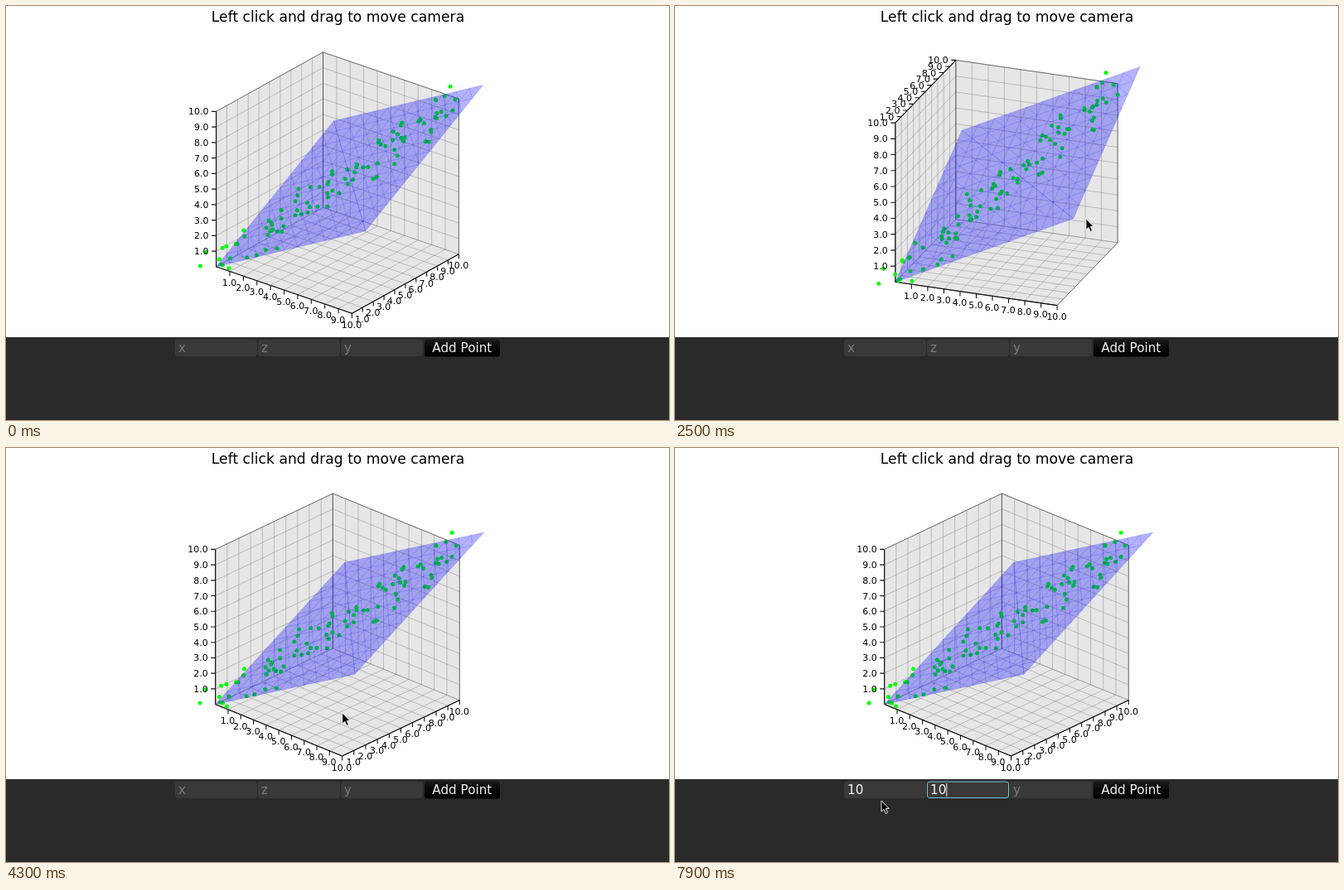
An HTML page for the animation above (8000 ms loop, 800 by 500 pixels).

```html
<!DOCTYPE html>
<html lang="en">
<head>
<meta charset="utf-8">
<title>3D scatter plot</title>
<style>
html, body { margin: 0; width: 100%; height: 100%; overflow: hidden; background: #fff; }
svg { display: block; width: 800px; height: 500px; font-family: "DejaVu Sans", sans-serif; }
path { fill: none; }
#labels { font-size: 11px; }
.form { font-size: 15.2px; }
</style>
</head>
<body>
<svg viewBox="0 0 800 500">
  <defs>
    <linearGradient id="dark" x2="0" y2="1">
      <stop offset="0" stop-color="#1a1a1a"/><stop offset=".5" stop-color="#080808"/><stop offset="1" stop-color="#020202"/>
    </linearGradient>
  </defs>
  <rect width="800" height="500" fill="#fff"/>
  <text x="400.5" y="19" font-size="17.2" text-anchor="middle">Left click and drag to move camera</text>
  <path id="walls" style="fill:#e6e6e6"/>
  <path id="grid" stroke="#777" stroke-opacity=".5" stroke-width=".8"/>
  <path id="edges" stroke="#333" stroke-opacity=".65" stroke-width=".9"/>
  <path id="axes" stroke="#111" stroke-width="1.1"/>
  <path id="dots" stroke="#00ff00" stroke-width="5" stroke-linecap="round"/>
  <path id="plane" style="fill:#0000ff" fill-opacity=".3"/>
  <path id="wire" stroke="#0000ff" stroke-opacity=".2" stroke-width=".8"/>
  <g id="labels"></g>
  <rect y="400" width="800" height="100" fill="#2a2a2a"/>
  <g class="form" id="form"></g>
  <rect x="505" y="402.5" width="91" height="21" rx="3" fill="url(#dark)"/>
  <text class="form" x="550.3" y="418" text-anchor="middle" fill="#f0f0f0">Add Point</text>
  <path id="caret" stroke="#f0f0f0"/>
  <path id="arrow" d="M0 0V13.2L3 10.4 5.3 15.4 7.6 14.4 5.4 9.5H9.3Z" style="fill:#000" stroke="#fff" stroke-width=".9"/>
  <g id="beam">
    <path d="M-3 -7.5H-1L0 -6.5 1 -7.5H3M0 -6.5V6.5M-3 7.5H-1L0 6.5 1 7.5H3" stroke="#fff" stroke-width="3.2"/>
    <path d="M-3 -7.5H-1L0 -6.5 1 -7.5H3M0 -6.5V6.5M-3 7.5H-1L0 6.5 1 7.5H3" stroke="#000" stroke-width="1.1"/>
  </g>
</svg>
<script>
const $ = id => document.getElementById(id);
const setPath = (id, d) => $(id).setAttribute('d', d);
const add = (parent, tag, attrs) => {
  const el = document.createElementNS('http://www.w3.org/2000/svg', tag);
  for (const k in attrs) el.setAttribute(k, attrs[k]);
  return parent.appendChild(el);
};
const LOOP = 8000, CX = 400, CY = 213.5, UNIT = 20.85, TURN = 0.2565;

// Pointer moves: start, end, x, y at the end; it rests between moves
const moves = [
  [40, 800, 634, 250], [870, 1730, 703, 238], [1760, 2500, 496, 257], [2500, 2620, 496, 305],
  [2620, 3730, 381, 319], [3780, 4150, 409, 318], [4250, 4880, 236, 419], [5600, 5800, 249, 426]
];
const drags = [moves[1], moves[4], moves[5]];

const progress = (t, a, b) => {
  const k = Math.min(Math.max((t - a) / (b - a), 0), 1);
  return k * k * (3 - 2 * k);
};

function pointerAt(t) {
  let x = 788, y = 3;
  for (const [from, to, mx, my] of moves) {
    const k = progress(t, from, to);
    x += (mx - x) * k;
    y += (my - y) * k;
  }
  return [x, y];
}

// Only dragging turns the camera
function cameraAt(t) {
  let yaw = 38.2, pitch = 25.9;
  for (const [from, to] of drags) {
    const a = pointerAt(from), b = pointerAt(Math.min(Math.max(t, from), to));
    yaw -= TURN * (b[0] - a[0]);
    pitch += TURN * (b[1] - a[1]);
  }
  const a = yaw * Math.PI / 180, e = pitch * Math.PI / 180;
  const ca = Math.cos(a), sa = Math.sin(a), ce = Math.cos(e), se = Math.sin(e);
  return { right: [ca, 0, sa], up: [-sa * se, ce, ca * se], near: [sa * ce, se, -ca * ce] };
}

const dot = (a, b) => a[0] * b[0] + a[1] * b[1] + a[2] * b[2];

// Noisy samples along x = y = z
let seed = 11;
const random = () => (seed = (seed * 16807) % 2147483647) / 2147483647;
const samples = Array.from({ length: 96 }, (_, i) =>
  [0, 1, 2].map(() => i / 9.5 - 5 + (random() - .5) * 1.8));

const labels = Array.from({ length: 30 }, (_, i) => {
  const el = add($('labels'), 'text', {});
  el.textContent = (i % 10 + 1).toFixed(1);
  return el;
});

const fields = ['x', 'z', 'y'].map((name, i) => {
  const x = 204 + i * 100;
  const box = add($('form'), 'rect', { x: x + .5, y: 403, width: 98, height: 19.5, rx: 2.5, fill: '#393939' });
  const text = add($('form'), 'text', { x: x + 4, y: 418 });
  return { name, x, box, text };
});

function drawPlot(cam) {
  const at = p => [CX + UNIT * dot(p, cam.right), CY - UNIT * dot(p, cam.up)];
  const fmt = p => at(p).map(c => c.toFixed(2)).join(' ');
  const line = (...pts) => 'M' + pts.map(fmt).join('L');
  const xb = cam.near[0] > 0 ? -5 : 5, zb = cam.near[2] > 0 ? -5 : 5;
  const xf = -xb, zf = -zb;

  const faces = [
    (a, b) => [a, -5, b],
    (a, b) => [xb, a, b],
    (a, b) => [a, b, zb]
  ];
  let walls = '', grid = '';
  for (const f of faces) {
    walls += line(f(-5, -5), f(5, -5), f(5, 5), f(-5, 5)) + 'Z';
    for (let k = -5; k <= 5; k++) grid += line(f(k, -5), f(k, 5)) + line(f(-5, k), f(5, k));
  }
  setPath('walls', walls);
  setPath('grid', grid);
  setPath('edges', line([xb, -5, zb], [xb, 5, zb]) + line(
    [xb, 5, zb], [xb, 5, zf], [xb, -5, zf], [xf, -5, zf], [xf, -5, zb], [xf, 5, zb]) + 'Z');

  // Shallow axes run along the floor, steep ones along the top of a wall
  const steep = v => Math.abs(cam.up[v]) > Math.abs(cam.right[v]);
  const xs = steep(0), zs = steep(2);
  const left = [xb, 0, zf], right = [xf, 0, zb];
  const side = dot(left, cam.near) > dot(right, cam.near) ? left : right;
  const axes = [
    [k => xs ? [k, 5, zb] : [k, -5, zf], xs],
    [k => [side[0], k, side[2]], true],
    [k => zs ? [xb, 5, k] : [xf, -5, k], zs]
  ];
  let d = '';
  axes.forEach(([edge, beside], n) => {
    d += line(edge(-5), edge(5));
    const dir = at(edge(0))[0] < CX ? -1 : 1;
    for (let i = 0; i < 10; i++) {
      const [x, y] = at(edge(i - 4)), el = labels[n * 10 + i];
      d += `M${x} ${y}` + (beside ? `h${dir * 5.5}` : 'v5.5');
      el.setAttribute('x', beside ? x + (dir < 0 ? -9 : 8) : x - .5);
      el.setAttribute('y', beside ? y + 4 : y + 17.5);
      el.setAttribute('text-anchor', !beside ? 'middle' : dir < 0 ? 'end' : 'start');
    }
  });
  setPath('axes', d);
  setPath('dots', samples.map(p => `M${fmt(p)}h.01`).join(''));

  const fit = (x, z) => [x - 5, .51 * x + .472 * z - 5, z - 5];
  let wire = '';
  for (let k = 0; k <= 11; k++) {
    wire += line(fit(k, 0), fit(k, 11)) + line(fit(0, k), fit(11, k));
    wire += line(fit(0, k), fit(k, 0)) + line(fit(k, 11), fit(11, k));
  }
  setPath('plane', line(fit(0, 0), fit(11, 0), fit(11, 11), fit(0, 11)) + 'Z');
  setPath('wire', wire);
}

function drawForm(t) {
  const typed = (a, b) => t < a ? '' : t < b ? '1' : '10';
  const values = [typed(6780, 6920), typed(7600, 7740), ''];
  const focus = t < 5600 ? -1 : t < 7250 ? 0 : 1;
  fields.forEach((f, i) => {
    f.text.textContent = values[i] || f.name;
    f.text.setAttribute('fill', values[i] ? '#f0f0f0' : '#7a7a7a');
    f.box.setAttribute('stroke', i === focus ? '#7cc4d4' : '#393939');
  });
  const since = t - [5600, 6780, 6920, 7250, 7600, 7740].filter(k => k <= t).pop();
  const on = focus >= 0 && Math.floor(since / 500) % 2 === 0;
  const x = focus < 0 ? 0 : fields[focus].x + 4.5 + values[focus].length * 9.67;
  setPath('caret', on ? `M${x} 405V421` : '');
}

function drawPointer(t) {
  const [x, y] = pointerAt(t);
  const over = y > 402 && y < 424 && x > 204 && x < 504;
  const place = `translate(${x.toFixed(1)} ${y.toFixed(1)})`;
  $('arrow').setAttribute('transform', place);
  $('beam').setAttribute('transform', place);
  $('arrow').style.display = t < 40 || over ? 'none' : '';
  $('beam').style.display = over ? '' : 'none';
}

function render(t) {
  drawPlot(cameraAt(t));
  drawForm(t);
  drawPointer(t);
}

const start = performance.now();
function tick() {
  render((performance.now() - start) % LOOP);
  requestAnimationFrame(tick);
}
tick();
</script>
</body>
</html>
```
